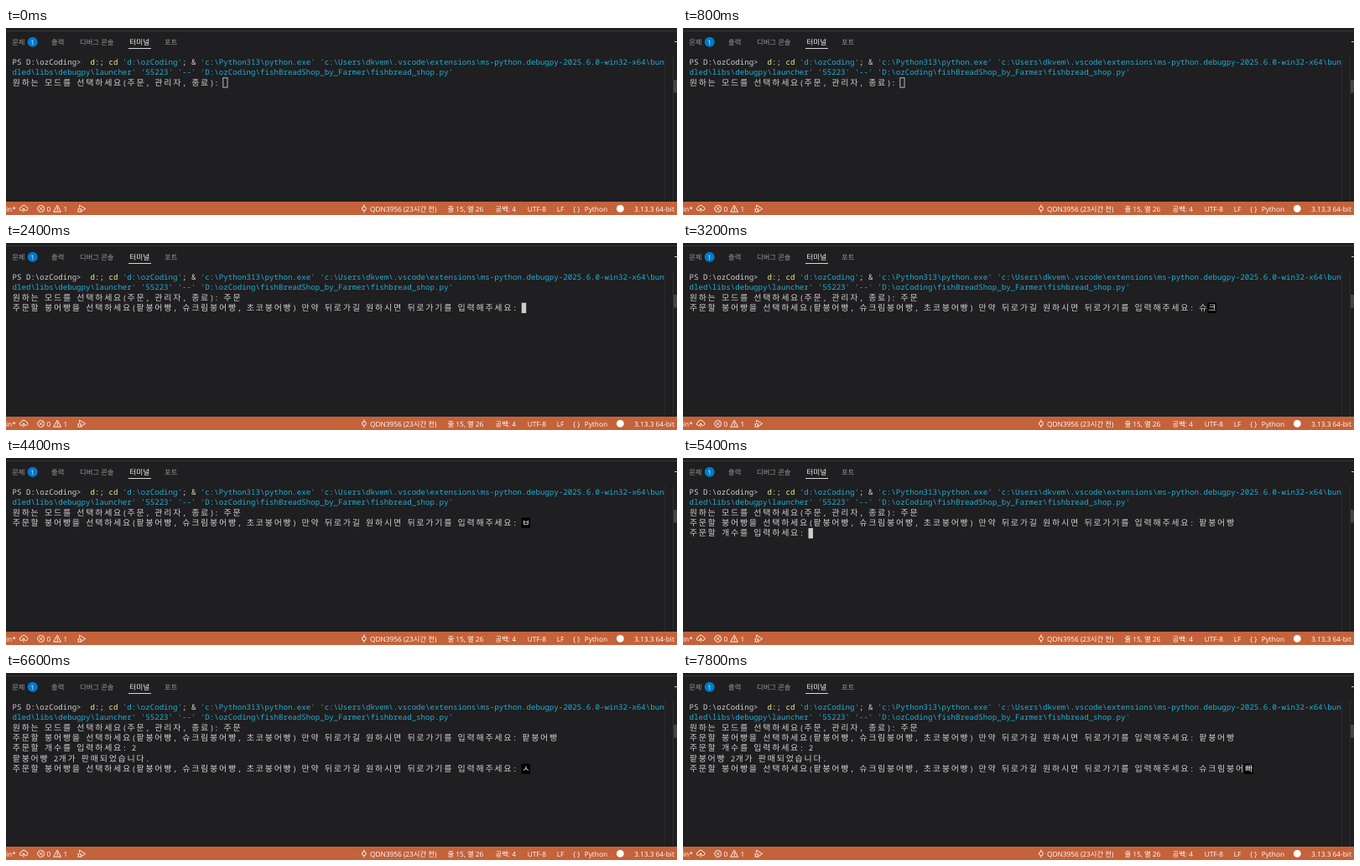
These frames come from a looping animation (800 by 224 pixels, 8000 ms). An HTML page:

```html
<!DOCTYPE html>
<html lang="ko">
<head>
<meta charset="utf-8">
<title>Terminal</title>
<style>
  html, body { margin: 0; width: 100%; height: 100%; overflow: hidden; background: #1f1e20; }
  svg { display: block; width: 100%; height: 100%; }
  text { white-space: pre; text-rendering: geometricPrecision; }
  .tabs { font: 8.3px "Noto Sans CJK KR", "Noto Sans CJK", sans-serif; fill: #999; }
  .tabs .active { font-size: 8.7px; font-weight: 500; fill: #f2f2f2; }
  .tabs .count { font: 7.5px "Open Sans", sans-serif; fill: #fff; text-anchor: middle; }
  .status { font: 8.3px "Open Sans", "Noto Sans CJK KR", "Noto Sans CJK", sans-serif; fill: #fff; }
  .icon { fill: none; stroke: #fff; stroke-width: .9; stroke-linejoin: round; stroke-linecap: round; }
  .latin { font: 500 9.12px "Noto Sans Mono", monospace; }
  .hangul { font: 300 10px "Noto Sans CJK KR", "Noto Sans CJK", sans-serif; }
  .plain { fill: #d0d0d0; }
  .command { fill: #f0f08a; }
  .string { fill: #20aed2; }
  .ime { fill: #fff; }
</style>
</head>
<body>
<svg viewBox="0 0 800 224" xmlns="http://www.w3.org/2000/svg">
  <rect width="800" height="224" fill="#1f1e20"/>
  <rect y="3" width="800" height="1" fill="#383738"/>

  <g class="tabs">
    <text x="7.2" y="19.6">문제</text>
    <circle cx="31.7" cy="16.8" r="6" fill="#007acc"/>
    <text class="count" x="31.7" y="19.5">1</text>
    <text x="54" y="19.6">출력</text>
    <text x="88" y="19.6">디버그 콘솔</text>
    <text class="active" x="147.3" y="19.6">터미널</text>
    <rect x="146" y="24" width="27" height="1" fill="#d8d8d8"/>
    <text x="189" y="19.6">포트</text>
  </g>
  <rect x="797" y="16" width="3" height="1" fill="#ccc"/>

  <g id="header"></g>
  <g id="session"></g>

  <rect x="785" y="33" width="1" height="175" fill="#2a292b"/>
  <rect x="795" y="33" width="1" height="175" fill="#2e2d2f"/>
  <rect x="796" y="62" width="4" height="15.5" fill="#464547"/>

  <rect y="208" width="800" height="16" fill="#c4623a"/>
  <g class="icon">
    <path d="M19 218.6h-.8a1.9 1.9 0 0 1 0-3.8a3 3 0 0 1 5.8-.5a2.2 2.2 0 0 1 .3 4.3H23M21 220.2v-4.2m-1.6 1.6l1.6-1.6l1.6 1.6"/>
    <path d="M37.6 216.5a4 4 0 1 0 8 0a4 4 0 1 0-8 0M40 214.9l3.2 3.2m0-3.2l-3.2 3.2"/>
    <path d="M61.3 212.6l4.2 7.6h-8.4zM61.3 215.2v2.4m0 1v.3"/>
    <path d="M87.5 214.5v-2.3l7.2 4.3l-4.4 2.8M86.3 217.6a1.5 1.5 0 0 1 3 0v1.3a1.5 1.5 0 0 1-3 0zM85.5 217l.8.6m-.8 2.8l.8-.6m3.8-2.8l-.8.6m.8 2.8l-.8-.6"/>
    <path d="M424.5 216.3a2.4 2.4 0 1 0 4.8 0a2.4 2.4 0 1 0-4.8 0M426.9 211.8v2.1m0 4.8v2.1"/>
  </g>
  <circle cx="732.3" cy="216.4" r="4.4" fill="#fff"/>
  <g class="status">
    <text x="0" y="219.5">in*</text>
    <text x="48.5" y="219.5">0</text>
    <text x="68.5" y="219.5">1</text>
    <text x="434" y="219.5">QDN3956 (23시간 전)</text>
    <text x="526.5" y="219.5">줄 15, 열 26</text>
    <text x="583.5" y="219.5">공백: 4</text>
    <text x="621.7" y="219.5">UTF-8</text>
    <text x="656.7" y="219.5">LF</text>
    <text x="676" y="219.5">{ }</text>
    <text x="689.7" y="219.5">Python</text>
    <text x="749" y="219.5">3.13.3 64-bit</text>
  </g>
</svg>
<script>
const LEFT = 7.5, CELL = 5.473, TOP = 34.5, LINE = 12.37, LOOP = 8000;
const header = document.getElementById('header');
const session = document.getElementById('session');

function add(parent, tag, attrs, content = '') {
  const node = document.createElementNS('http://www.w3.org/2000/svg', tag);
  for (const key in attrs) node.setAttribute(key, attrs[key]);
  node.textContent = content;
  parent.append(node);
  return node;
}

const cellX = col => LEFT + col * CELL;
const rowY = row => TOP + row * LINE;

// Writes text on the terminal grid (Hangul takes two cells); returns the next column.
function write(parent, row, col, text, color = 'plain') {
  for (const run of text.match(/[ㄱ-힣]+|[^ㄱ-힣]+/g) || []) {
    const wide = /[ㄱ-힣]/.test(run), span = wide ? 2 : 1;
    const xs = [...run].map((_, i) => (cellX(col + i * span) + (wide ? .2 : 0)).toFixed(2));
    add(parent, 'text', {
      x: xs.join(' '), y: rowY(row) + 9.5, class: `${wide ? 'hangul' : 'latin'} ${color}`
    }, run);
    col += run.length * span;
  }
  return col;
}

const writeParts = (row, parts) =>
  parts.reduce((col, [text, color]) => write(header, row, col, text, color), 0);

writeParts(0, [
  ['PS D:\\ozCoding>  '], ['d:', 'command'], ['; '], ['cd ', 'command'],
  ["'d:\\ozCoding'", 'string'], ['; & '],
  ["'c:\\Python313\\python.exe' 'c:\\Users\\dkvem\\.vscode\\extensions\\ms-python.debugpy-2025.6.0-win32-x64\\bun", 'string']
]);
writeParts(1, [
  ["dled\\libs\\debugpy\\launcher' '55223' '--' 'D:\\ozCoding\\fishBreadShop_by_Farmer\\fishbread_shop.py'", 'string']
]);

const MODE = '원하는 모드를 선택하세요(주문, 관리자, 종료): ';
const MENU = '주문할 붕어빵을 선택하세요(팥붕어빵, 슈크림붕어빵, 초코붕어빵) 만약 뒤로가길 원하시면 뒤로가기를 입력해주세요: ';
const COUNT = '주문할 개수를 입력하세요: ';
const log = [MODE + '주문', MENU + '팥붕어빵', COUNT + '2', '팥붕어빵 2개가 판매되었습니다.'];

// Finished log lines and the prompt that follows, per stage.
const stages = [[0, MODE], [1, MENU], [2, COUNT], [4, MENU]];

// start ms, stage, committed input, syllable being composed
const keys = [
  [0, 0, '', ''], [1000, 0, '', 'ㅈ'], [1200, 0, '', '주'], [1400, 0, '', '줌'],
  [1600, 0, '주', '무'], [1800, 0, '주', '문'],
  [2200, 1, '', ''], [2600, 1, '', 'ㅅ'], [2800, 1, '', '슈'], [3000, 1, '', '슠'],
  [3200, 1, '슈', '크'], [3600, 1, '슈', 'ㅋ'], [3800, 1, '', '슈'], [4000, 1, '', ''],
  [4400, 1, '', 'ㅂ'], [4600, 1, '', '팥'], [4800, 1, '팥', '붕'],
  [5000, 1, '팥붕', '어'], [5200, 1, '팥붕어', '빵'],
  [5400, 2, '', ''], [5800, 2, '2', ''],
  [6200, 3, '', ''], [6600, 3, '', 'ㅅ'], [6800, 3, '', '슈'], [7000, 3, '슈', '크'],
  [7200, 3, '슈크', '림'], [7400, 3, '슈크림', '부'], [7600, 3, '슈크림붕', '어'],
  [7800, 3, '슈크림붕어', '빠']
];

function draw([start, stage, typed, composing]) {
  session.replaceChildren();
  const [done, prompt] = stages[stage];
  log.slice(0, done).forEach((line, i) => write(session, i + 2, 0, line));
  const row = done + 2, col = write(session, row, 0, prompt + typed);
  const x = cellX(col), y = rowY(row);
  if (composing) {
    add(session, 'rect', { x: x - .6, y, width: CELL * 2 - .3, height: LINE, fill: '#000' });
    write(session, row, col, composing, 'ime');
  } else if (start === 0) {
    add(session, 'rect', {
      x: x - .4, y: y + .5, width: CELL - .3, height: LINE - 1,
      fill: 'none', stroke: '#ccc', 'stroke-width': .9
    });
  } else {
    add(session, 'rect', { x: x - .3, y, width: CELL, height: LINE, fill: '#ccc' });
  }
}

let shown;
function tick() {
  const time = performance.now() % LOOP;
  const key = keys.findLast(([start]) => start <= time);
  if (key !== shown) draw(shown = key);
  requestAnimationFrame(tick);
}
tick();
</script>
</body>
</html>
```
